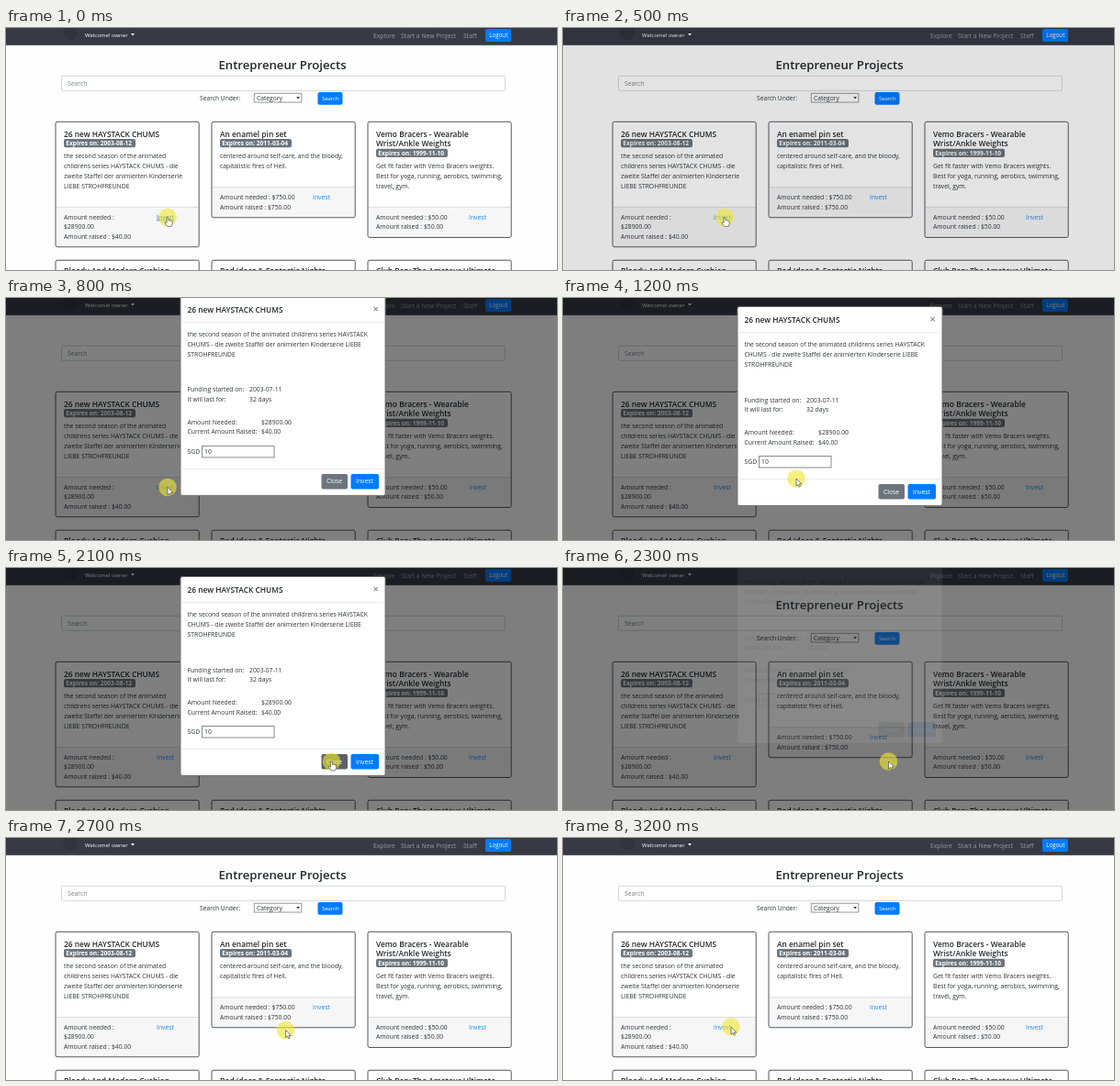
An HTML page that plays this animation: 600x264 px, repeating every 3.3 s.

```html
<!DOCTYPE html>
<html lang="en">
<head>
<meta charset="utf-8">
<title>Entrepreneur Projects</title>
<style>
  html, body { margin: 0; width: 100%; height: 100%; overflow: hidden; background: #fff; }
  svg { display: block; width: 600px; height: 264px; }
  text { font-family: "Open Sans", "Noto Sans", sans-serif; font-size: 6.8px; fill: #2f3236; white-space: pre; }
  .h { font-weight: 600; font-size: 8.4px; fill: #24272b; }
  .link { fill: #1a86f5; }
  .link.hover { fill: #0056b3; text-decoration: underline; }
  .nav { fill: #9a9ca2; }
  .white { fill: #fff; }
  .muted { fill: #7b8187; }
  .badge { fill: #fff; font-weight: 700; font-size: 6.6px; }
</style>
</head>
<body>
<svg viewBox="0 0 600 264">
  <g id="page"></g>
  <rect id="backdrop" width="600" height="264" opacity="0"/>
  <g id="modal" opacity="0"></g>
  <g id="pointer">
    <circle r="9.8" fill="#eee632" fill-opacity=".62"/>
    <path id="arrow" d="M0 0V8.2L1.9 6.5L3.2 9.3L4.5 8.7L3.3 6H5.9Z" fill="#fff" stroke="#333" stroke-width=".6"/>
    <path id="hand" d="M-.9 .3Q0 -.7 .9 .3V3.4Q1.8 2.9 2.4 3.6Q3.3 3.1 3.8 3.9Q5 3.5 5.1 4.8V7Q5 8.3 4.2 9.9H-.2L-3 6.3Q-3.2 5 -1.9 5.3L-.9 6.2Z" fill="#fff" stroke="#333" stroke-width=".6"/>
  </g>
</svg>
<script>
const LOOP = 3300, STEP = 100, LEADING = 10.8, BORDER = '#55575b';
const byId = id => document.getElementById(id);
const page = byId('page'), modal = byId('modal');

function add(parent, tag, attrs, content) {
  const node = document.createElementNS('http://www.w3.org/2000/svg', tag);
  for (const key in attrs) node.setAttribute(key, attrs[key]);
  if (content !== undefined) node.textContent = content;
  parent.append(node);
  return node;
}
const text = (parent, x, y, content, cls = '', size) =>
  add(parent, 'text', { x, y, class: cls, ...(size && { style: `font-size:${size}px` }) }, content);
const lines = (parent, x, y, list, cls) =>
  list.forEach((line, i) => text(parent, x, y + i * LEADING, line, cls));
const box = (parent, x, y, width, height, fill, stroke = 'none', rx = 0) =>
  add(parent, 'rect', { x, y, width, height, fill, stroke, rx });

function drawHeader() {
  box(page, 0, 0, 600, 264, '#fefefe');
  box(page, 0, 0, 600, 18.8, '#373a44');
  add(page, 'circle', { cx: 70, cy: 5, r: 8, fill: '#31343d' });
  text(page, 86, 9.5, 'Welcome! owner', 'white', 6);
  add(page, 'path', { d: 'M136 6h4l-2 2.4z', fill: '#fff' });
  text(page, 400, 10.5, 'Explore', 'nav');
  text(page, 430, 10.5, 'Start a New Project', 'nav');
  text(page, 498, 10.5, 'Staff', 'nav');
  box(page, 522, 1, 28, 14, '#007bff', 'none', 2);
  text(page, 526.3, 10.3, 'Logout', 'white', 6.2);

  text(page, 231.5, 45, 'Entrepreneur Projects', 'h', 13.15);
  box(page, 60.5, 52.3, 483, 16, '#fff', '#d4d6d9', 1);
  text(page, 67, 63, 'Search', 'muted');
  text(page, 211, 78.5, 'Search Under:', '', 6.7);
  box(page, 270.3, 71.3, 51.5, 9.7, '#fff', '#989898');
  text(page, 273, 78.5, 'Category', '', 6.7);
  add(page, 'path', { d: 'M316.3 75h3.6l-1.8 2.6z', fill: '#333' });
  box(page, 339.5, 70, 27, 13.8, '#007bff', 'none', 2);
  text(page, 344, 79.2, 'Search', 'white', 5.9);
}

function drawCard({ x, bottom, split, title, date, body, amounts }) {
  box(page, x, 102.3, 156.2, bottom - 102.3, '#fff', 'none', 2);
  box(page, x + .5, split, 155.2, bottom - split, '#f6f6f7');
  box(page, x + .5, split, 155.2, .8, '#d6d6d8');
  box(page, x, 102.3, 156.2, bottom - 102.3, 'none', BORDER, 2);
  const left = x + 9, shift = (title.length - 1) * LEADING;
  lines(page, left, 118.6, title, 'h');
  box(page, left, 121 + shift, 78, 9.3, '#6c757d', 'none', 2);
  text(page, left + 2.3, 128 + shift, 'Expires on: ' + date, 'badge');
  lines(page, left, 142.3 + shift, body);
  lines(page, left, split + 13.6, amounts);
  return text(page, x + 110, split + 13.6, 'Invest', 'link');
}

function drawModal() {
  box(modal, 190, 9.5, 223, 217, '#fff', '#777', 2);
  text(modal, 197.5, 26.8, '26 new HAYSTACK CHUMS', 'h');
  text(modal, 399.5, 27.3, '×', 'muted h', 11);
  box(modal, 190.5, 37, 222, .8, '#e4e6e9');
  lines(modal, 197.5, 53.3, [
    'the second season of the animated childrens series HAYSTACK',
    'CHUMS - die zweite Staffel der animierten Kinderserie LIEBE',
    'STROHFREUNDE']);
  lines(modal, 197.5, 113.5, ['Funding started on:', 'It will last for:']);
  lines(modal, 265, 113.5, ['2003-07-11', '32 days']);
  lines(modal, 197.5, 148.8, ['Amount Needed:', 'Current Amount Raised:']);
  lines(modal, 278, 148.8, ['$28900.00', '$40.00']);
  text(modal, 197.5, 181.3, 'SGD');
  box(modal, 213.5, 172.5, 78.5, 12.5, '#fff', '#8a8a8a');
  text(modal, 216, 181.3, '10');
  box(modal, 190.5, 197, 222, .8, '#e4e6e9');
  const close = box(modal, 343.5, 203, 28.5, 16.5, '#6c757d', 'none', 2);
  text(modal, 349, 213.6, 'Close', 'white');
  box(modal, 375.5, 203, 30.5, 16.5, '#007bff', 'none', 2);
  text(modal, 381, 213.6, 'Invest', 'white');
  return close;
}

drawHeader();
const investLink = drawCard({
  x: 54, bottom: 238.8, split: 195, title: ['26 new HAYSTACK CHUMS'], date: '2003-08-12',
  body: ['the second season of the animated', 'childrens series HAYSTACK CHUMS - die',
    'zweite Staffel der animierten Kinderserie', 'LIEBE STROHFREUNDE'],
  amounts: ['Amount needed :', '$28900.00', 'Amount raised : $40.00'] });
drawCard({
  x: 224, bottom: 206.8, split: 173.5, title: ['An enamel pin set'], date: '2011-03-04',
  body: ['centered around self-care, and the bloody,', 'capitalistic fires of Hell.'],
  amounts: ['Amount needed : $750.00', 'Amount raised : $750.00'] });
drawCard({
  x: 394, bottom: 228.5, split: 195, title: ['Vemo Bracers - Wearable', 'Wrist/Ankle Weights'], date: '1999-11-10',
  body: ['Get fit faster with Vemo Bracers weights.', 'Best for yoga, running, aerobics, swimming,', 'travel, gym.'],
  amounts: ['Amount needed : $50.00', 'Amount raised : $50.00'] });
['Bloody And Modern Cushion', 'Bad Ideas & Fantastic Nights', 'Club Pen: The Amateur Ultimate'].forEach((title, i) => {
  const x = 54 + i * 170;
  box(page, x, 253.3, 156.2, 40, '#fff', BORDER, 2);
  text(page, x + 9, 268.3, title, 'h');
});
const closeButton = drawModal();

const ramp = (t, start, length) => Math.min(1, Math.max(0, (t - start) / length));
const smooth = p => p * p * (3 - 2 * p);

// cubic-bezier(0, 0, .58, 1)
function easeOut(p) {
  let lo = 0, hi = 1;
  for (let i = 0; i < 20; i++) {
    const s = (lo + hi) / 2;
    if (1.74 * s * s * (1 - s) + s ** 3 < p) lo = s; else hi = s;
  }
  return 3 * lo * lo - 2 * lo ** 3;
}

// start, duration, destination
const moves = [[850, 350, 254, 197], [1250, 500, 354.5, 211], [2450, 700, 183, 206]];
function pointerAt(t) {
  let x = 176, y = 206.5;
  for (const [start, length, toX, toY] of moves) {
    const p = smooth(ramp(t, start, length));
    x += (toX - x) * p;
    y += (toY - y) * p;
  }
  return [x, y];
}

function render(t) {
  const fade = ramp(t, 467, 150) - ramp(t, 2316, 150);
  byId('backdrop').setAttribute('opacity', fade / 2);

  const shown = ramp(t, 617, 150) - ramp(t, 2160, 150);
  const slide = -54 * (1 - easeOut(ramp(t, 617, 300)) + easeOut(ramp(t, 2160, 300)));
  modal.setAttribute('opacity', shown);
  modal.setAttribute('transform', `translate(0 ${slide})`);

  const overInvest = t < 450, overClose = t >= 1650 && t < 2250;
  investLink.classList.toggle('hover', overInvest);
  closeButton.setAttribute('fill', overClose ? '#5a6268' : '#6c757d');
  const hand = t < 600 || overClose;
  byId('hand').setAttribute('visibility', hand ? 'visible' : 'hidden');
  byId('arrow').setAttribute('visibility', hand ? 'hidden' : 'visible');
  byId('pointer').setAttribute('transform', `translate(${pointerAt(t)})`);
}

const began = performance.now();
function tick() {
  const t = (performance.now() - began) % LOOP;
  render(Math.floor(t / STEP) * STEP);
  requestAnimationFrame(tick);
}
tick();
</script>
</body>
</html>
```
